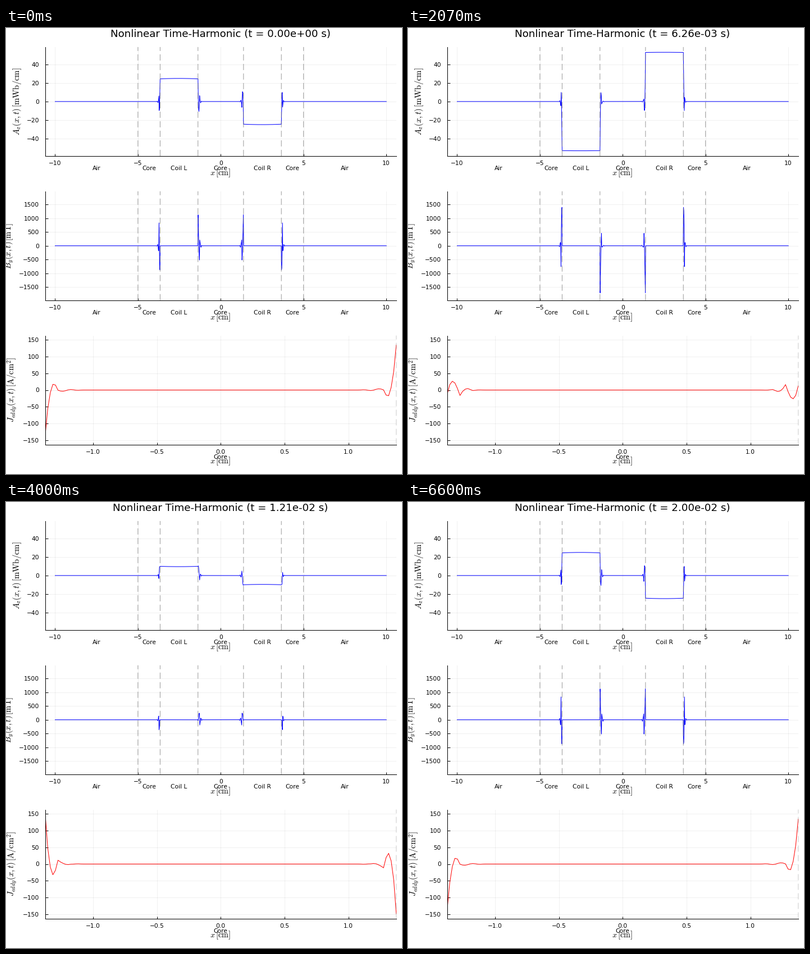
These frames come from a looping animation (705x794 px, 6.67 s). A matplotlib script:

```python
import numpy as np
import matplotlib.pyplot as plt
from matplotlib.animation import FuncAnimation

W, H, DPI = 705, 794, 64
PT = 72 / DPI  # points per pixel
TICKS, TICK_MS = 230, 29  # one loop of 6670 ms
STEPS, FPS, PERIOD = 100, 15, 0.02

plt.rcParams["font.family"] = "DejaVu Sans"
plt.rcParams["mathtext.fontset"] = "cm"

# Geometry in cm
CORE, COIL_OUT, COIL_IN, EDGE = 5.0, 3.66, 1.375, 10.0
H_IN, H_OUT = 0.02, 0.019
SIGMA_W = 2.83  # J = j * SIGMA_W * A inside the core

# Phasors at the mesh nodes, counted from the coil edge into the core
J_in = np.array([
    -134 + 69.5j, -55.5 + 6j, -8 - 25j, 17 - 30j, 15 - 11.5j, -0.5 + 17.8j,
    -3 + 6j, -3.5 - 1j, -2 - 4j, 0.5 - 2j, 1.5 + 1j, 0.8 + 0.5j, -0.5, -0.8,
    -0.2, 0, 0])
A_in = J_in / (1j * SIGMA_W)
A_out = np.array([
    A_in[0], 7.9 + 25.6j, -7.5 + 5.8j, -9.8 - 6.6j, 6 + 2.4j, 2.6 + 2.2j,
    -0.6 + 1j, -1.2 - 0.4j, -0.4 - 0.5j, 0.3 - 0.1j, 0.2, 0, 0])


def odd(x, f):
    """Extend the left half antisymmetrically to the right."""
    return np.r_[x, -x[::-1]], np.r_[f, -f[::-1]]


x_in = -COIL_IN + H_IN * np.arange(len(A_in))
x_out = -COIL_OUT - H_OUT * np.arange(len(A_out))
x_coil = np.linspace(-COIL_OUT, -COIL_IN, 116)[1:-1]
u = np.linspace(-1, 1, 116)[1:-1]
A_coil = A_in[0] + 0.45 * (1 - u**2)

xa, A = odd(np.r_[-EDGE, x_out[::-1], x_coil, x_in],
            np.r_[0, A_out[::-1], A_coil, A_in])
xb = np.r_[-EDGE, (xa[1:] + xa[:-1]) / 2, EDGE]
B = np.r_[0, -np.diff(A) / np.diff(xa), 0]
xj, J = odd(x_in, J_in)

fig = plt.figure(figsize=(W / DPI, H / DPI), dpi=DPI, facecolor="white")


def label(x, y, s, size=10.67, **kw):
    kw = {"ha": "center", "va": "baseline", **kw}
    return fig.text(x / W, 1 - y / H, s, fontsize=size * PT, **kw)


def num(v, digits=0):
    return f"{v:.{digits}f}".replace("-", "\u2212")


def panel(top, xlim, ylim, xticks, yticks, digits, ylabel, base, regions):
    left, width, height = 69.8, 625, 194
    bottom = top + height
    ax = fig.add_axes([left / W, 1 - bottom / H, width / W, height / H])
    ax.set(xlim=(-xlim, xlim), ylim=(-ylim, ylim), xticks=xticks, yticks=yticks)
    ax.patch.set_visible(False)
    ax.spines[["top", "right"]].set_visible(False)
    ax.spines[["left", "bottom"]].set_linewidth(PT)
    ax.tick_params(direction="in", length=4.5 * PT, width=PT,
                   labelleft=False, labelbottom=False)
    ax.set_axisbelow(True)
    ax.grid(color="black", alpha=0.06, lw=PT)

    def px(x):
        return left + width * (x + xlim) / (2 * xlim)

    for v in xticks:
        label(px(v), bottom + 16.5, num(v, digits))
    for v in yticks:
        y = top + height * (ylim - v) / (2 * ylim)
        label(59, y + 4, num(v), ha="right")
    for x, name in regions:
        label(px(x), bottom + 25.5, name)
    label(382, bottom + 34, r"$x\,\mathrm{[cm]}$", 14.4)
    label(base, top + height / 2, ylabel, 14.67, rotation=90,
          rotation_mode="anchor")
    return ax


def walls(ax, xs, alpha):
    for x in xs:
        ax.axvline(x, color="gray", alpha=alpha, lw=PT, zorder=3,
                   ls=(0, (11, 6)), snap=False, clip_on=False)


mid_air, mid_core = (EDGE + CORE) / 2, (CORE + COIL_OUT) / 2
mid_coil = (COIL_OUT + COIL_IN) / 2
regions = [(-mid_air, "Air"), (-mid_core, "Core"), (-mid_coil, "Coil L"),
           (0, "Core"), (mid_coil, "Coil R"), (mid_core, "Core"),
           (mid_air, "Air")]
x_ticks = [-10, -5, 0, 5, 10]

ax_a = panel(33.9, 10.6, 59, x_ticks, range(-40, 41, 20), 0,
             r"$A_z(x,t)\,\mathrm{[mWb/cm]}$", 24, regions)
ax_b = panel(290.7, 10.6, 1980, x_ticks, range(-1500, 1501, 500), 0,
             r"$B_y(x,t)\,\mathrm{[mT]}$", 9.5, regions)
ax_j = panel(547.5, COIL_IN, 162.3, [-1, -0.5, 0, 0.5, 1],
             range(-150, 151, 50), 1,
             r"$J_{eddy}(x,t)\,\mathrm{[A/cm^2]}$", 15.5, [(0, "Core")])

bounds = [s * b for b in (CORE, COIL_OUT, COIL_IN) for s in (-1, 1)]
walls(ax_a, bounds, 0.8)
walls(ax_b, bounds, 0.8)
walls(ax_j, [COIL_IN], 0.4)

curves = [(ax.plot(x, f.real, color=c, lw=PT)[0], f)
          for ax, x, f, c in ((ax_a, xa, A, "blue"), (ax_b, xb, B, "blue"),
                              (ax_j, xj, J, "red"))]
title = label(382, 16, "", 18.3)


def update(i):
    # The step that has begun by the end of this tick, to the nearest 10 ms
    end = (i + 1) * TICK_MS - 1
    step = min((end + 5) * FPS // 1000, STEPS - 1)
    t = PERIOD * step / (STEPS - 1)
    turn = np.exp(2j * np.pi * t / PERIOD)
    for line, phasor in curves:
        line.set_ydata((phasor * turn).real)
    title.set_text(f"Nonlinear Time-Harmonic (t = {t:.2e} s)")
    return [line for line, _ in curves] + [title]


anim = FuncAnimation(fig, update, frames=TICKS, interval=TICK_MS,
                     repeat=True, repeat_delay=0, blit=False)
plt.show()
```
